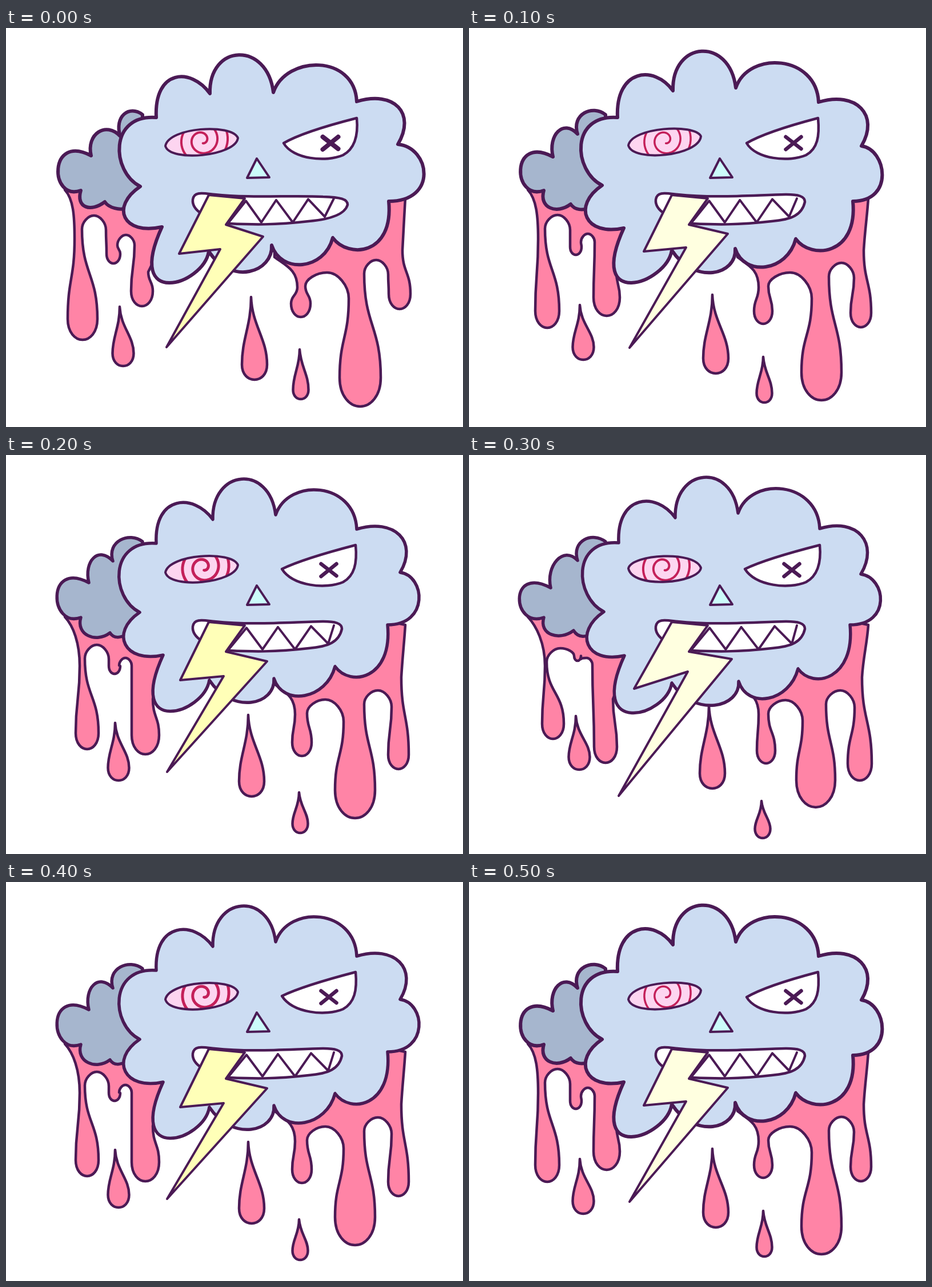
An HTML page with a canvas that plays this animation: 800 px wide and 700 px high, repeating every 600 ms.

```html
<!DOCTYPE html>
<html>
<head>
<meta charset="utf-8">
<title>Storm cloud</title>
<style>
html, body { margin: 0; height: 100%; overflow: hidden; background: #fff; }
canvas { display: block; }
</style>
</head>
<body>
<canvas id="stage" width="800" height="700"></canvas>
<script>
const ctx = document.getElementById('stage').getContext('2d');
const INK = '#4b1a55', PINK = '#ff84a6', WHITE = '#fff';

// Each outer list below holds one entry per pose.
// Puffs: control offsets from the two cusps that a bump joins.
const cloudPuffs = [
  [-51, -26, -83, -6], [-4, -85, -33, -46], [-2, -88, -11, -90], [23, -66, -4, -83],
  [66, -20, 32, -54], [50, 6, 79, 0], [9, 95, 27, 37], [-15, 58, 16, 50],
  [3, 47, 40, 61], [-10, 60, -66, 144], [-68, 15, -53, 36]
];
const cloudCusps = [
  [235, 278, 263, 157, 357, 115, 468, 113, 614, 129, 686, 204, 670, 304, 572, 368, 465, 381, 355, 392, 273, 349],
  [233, 276, 260, 157, 357, 110, 467, 105, 612, 130, 687, 207, 672, 304, 572, 370, 466, 387, 355, 390, 271, 351],
  [234, 276, 263, 155, 362, 113, 472, 105, 614, 130, 690, 206, 668, 298, 576, 371, 469, 392, 356, 395, 275, 351],
  [236, 275, 262, 154, 361, 110, 471, 102, 614, 129, 686, 209, 667, 298, 576, 375, 472, 397, 355, 400, 272, 352]
];
const backPuffs = [
  [-23, -18, -11, -35], [-25, -27, -9, -38], [-75, -40, -55, 20], [-9, 30, -25, 19], [7, 11, -10, 4]
];
const backCusps = [
  [200, 190, 149, 224, 173, 305], [190, 186, 147, 226, 178, 309],
  [187, 186, 145, 224, 182, 312], [190, 185, 143, 233, 183, 308]
];

// Drips: first neck x, then bulbs (x, bottom, radius) and arches (x, top, half width) in turn, last neck x.
const leftDrips = [
  [120, 134, 547, 26, 154, 329, 21, 188, 413, 12, 210, 363, 15, 238, 488, 19, 249],
  [121, 137, 526, 21, 155, 328, 22, 187, 398, 10, 208, 361, 12, 241, 505, 23, 258],
  [129, 142, 516, 20, 159, 333, 21, 190, 384, 10, 209, 356, 11, 244, 525, 24, 257],
  [133, 147, 498, 19, 160, 339, 24, 190, 361, 6, 206, 356, 10, 239, 540, 20, 252]
];
const rightDrips = [
  [510, 516, 507, 17, 562, 429, 38, 620, 664, 36, 648, 407, 21, 689, 493, 19, 694],
  [507, 515, 519, 16, 562, 429, 38, 617, 653, 35, 652, 412, 22, 686, 525, 18, 691],
  [506, 518, 528, 17, 559, 429, 32, 611, 637, 35, 651, 413, 24, 687, 551, 18, 692],
  [507, 520, 541, 16, 554, 430, 30, 607, 618, 34, 650, 413, 25, 684, 571, 21, 688]
];

// Drops: radius, lean, and tip x, tip y, bottom for each pose.
const drops = [
  [18.5, 6, [[199, 489, 593], [194, 486, 582], [191, 470, 571], [187, 458, 552]]],
  [22, 6, [[429, 472, 617], [426, 468, 606], [424, 456, 599], [420, 440, 585]]],
  [13.5, 2, [[514, 564, 651], [515, 577, 657], [513, 592, 663], [512, 607, 672]]]
];
const bolts = [
  'L450 366L281 560L375 388L303 396',
  'L453 361L281 561L380 385L306 392',
  'L457 362L282 556L381 388L305 395',
  'L460 358L262 598L383 380L289 410'
];

function shape(path, fill, width) {
  const p = new Path2D(path);
  if (fill) {
    ctx.fillStyle = fill;
    ctx.fill(p);
  }
  ctx.strokeStyle = INK;
  ctx.lineWidth = width;
  ctx.stroke(p);
}

function bumps(cusps, puffs, swell = 0) {
  let d = `M${cusps[0]} ${cusps[1]}`;
  puffs.forEach(([ax, ay, bx, by], i) => {
    const [x0, y0] = cusps.slice(2 * i);
    const [x1, y1] = cusps.slice((2 * i + 2) % cusps.length);
    const s = i === 5 ? swell : 0;
    d += `C${x0 + ax + s} ${y0 + ay} ${x1 + bx + s} ${y1 + by} ${x1} ${y1}`;
  });
  return d;
}

function drips(list, neckY, endY) {
  let x = list[0], y = neckY, d = '';
  const curve = (ax, ay, bx, by, nx, ny) => {
    d += `C${ax} ${ay} ${bx} ${by} ${nx} ${ny}`;
    x = nx;
    y = ny;
  };
  const sway = (nx, ny) => curve(x, (y + ny) / 2, nx, (y + ny) / 2, nx, ny);
  const shoulder = i => list[i + 1] - 1.4 * list[i + 2];
  for (let i = 1; i < 16; i += 6) {
    const [bx, by, r, ax, ay, w] = list.slice(i);
    const side = shoulder(i), low = by - 0.5 * r;
    sway(bx - r, side);
    curve(bx - r, low, bx - r / 2, by, bx, by);
    curve(bx + r / 2, by, bx + r, low, bx + r, side);
    if (i > 12) break;
    const drop = (h, limit) => ay + Math.max(2, Math.min(h, limit - ay));
    const l = drop(Math.min(24, 1.2 * w), side), e = drop(1.2 * w, shoulder(i + 6));
    sway(ax - w, l);
    curve(ax - w, (l + ay) / 2, ax - w / 2, ay, ax, ay);
    curve(ax + w / 2, ay, ax + w, (e + ay) / 2, ax + w, e);
  }
  sway(list[16], endY);
  return d;
}

function drop(tx, ty, by, r, cx) {
  const neck = ty + (by - ty) * 0.35, mid = ty + (by - ty) * 0.5;
  const l = cx - r, e = cx + r, wide = by - 1.2 * r, low = by - 0.4 * r;
  shape(`M${tx} ${ty}C${tx} ${neck} ${l} ${mid} ${l} ${wide}
    C${l} ${low} ${cx - r / 2} ${by} ${cx} ${by}
    C${cx + r / 2} ${by} ${e} ${low} ${e} ${wide}
    C${e} ${mid} ${tx + 2} ${neck} ${tx} ${ty}Z`, PINK, 4.5);
}

function spiralEye(k) {
  const y0 = [207, 206, 206, 199][k], y1 = [193, 190, 193, 198][k];
  const outline = `M279 ${y0}C285 174 395 167 406 ${y1}C402 225 287 236 279 ${y0}Z`;
  const p = new Path2D(outline), x = [343, 343, 345, 341][k];
  ctx.fillStyle = '#fdd5f0';
  ctx.fill(p);
  ctx.save();
  ctx.clip(p);
  ctx.beginPath();
  for (let t = 0.3; t < 2.7; t += 0.02) {
    const a = Math.PI * (1 - 2 * t), r = 18 * t;
    ctx.lineTo(x + r * Math.cos(a), 197 + r * Math.sin(a));
  }
  ctx.strokeStyle = '#c4205a';
  ctx.lineWidth = [4, 3.5, 5, 4][k];
  ctx.stroke();
  ctx.restore();
  shape(outline, null, 4);
}

function crossEye(k) {
  const x = k < 2 ? 486 : 483, y = k < 2 ? 202 : 200, tip = [614, 611, 612, 614][k];
  shape(`M${x} ${y}Q520 182 ${tip} 158C${tip + 3} 190 610 212 590 223C560 236 502 230 ${x} ${y}Z`, WHITE, 4.5);
  const cx = k < 2 ? 568 : 565, s = 13.5;
  shape(`M${cx - s} 191l${2 * s} 21m0 -21l${-2 * s} 22`, null, k ? 6.5 : 8);
}

function mouth(k) {
  const end = k ? 588 : 598, round = k ? 292 : 297, shift = [0, 2, 5, 6][k];
  shape(`M327 301C329 286 345 290 365 292C430 299 500 293 555 ${k ? 292 : 296}
    C${end - 12} ${round} ${end} ${round + 3} ${end} ${round + 13}
    C${end - 5} 328 565 336 530 339C470 346 430 345 390 343C350 335 325 320 327 301Z`, WHITE, 4.5);
  const teeth = [390, 420, 447, 473, 502, 529, 558, 574].map((x, i) =>
    `${x + (i < 7 ? shift * i / 5 : 0)} ${i % 2 ? 304 - i / 1.4 : 341 - (i > 5 ? 10 : 0)}`);
  shape('M' + teeth.join('L'), null, 4);
}

function draw(k) {
  ctx.fillStyle = WHITE;
  ctx.fillRect(0, 0, 800, 700);
  ctx.lineCap = ctx.lineJoin = 'round';
  const line = k < 2 ? 6 : 5.5, l = leftDrips[k], r = rightDrips[k];

  shape(`M103 284C118 300 ${l[0]} 330 ${l[0]} 370${drips(l, 370, 428)}
    L265 395L280 340L220 300L140 265Z`, PINK, 4.5);
  shape(`M470 402C492 418 ${r[0]} 425 ${r[0]} 455${drips(r, 455, 390)}
    C${r[16] + 2} 355 697 330 699 298L660 290L570 350L470 375Z`, PINK, 4.5);
  for (const [radius, lean, spots] of drops) {
    const [x, y, bottom] = spots[k];
    drop(x, y, bottom, radius, x + lean);
  }

  const [px, py, qx, qy, tx, ty] = backCusps[k];
  const back = [239, 152, px, py, qx, qy, 131, 285, tx, ty, 210, 316];
  shape(bumps(back, backPuffs) + 'L245 280L240 250Z', '#a6b6ce', line);
  shape(bumps(cloudCusps[k], cloudPuffs, k ? -6 : 7) + 'Z', '#ccdcf2', line);

  spiralEye(k);
  crossEye(k);
  shape('M439 229L422 263L461 262Z', '#ccfbfa', 4);
  mouth(k);
  shape(`M355 293L418 299L385 345${bolts[k]}Z`, k % 2 ? '#ffffe0' : '#ffffb8', 4);
}

const order = [0, 1, 2, 3, 2, 1];
let shown = -1;
function tick() {
  const next = order[Math.floor(performance.now() / 100) % order.length];
  if (next !== shown) draw(shown = next);
  requestAnimationFrame(tick);
}
tick();
</script>
</body>
</html>
```
